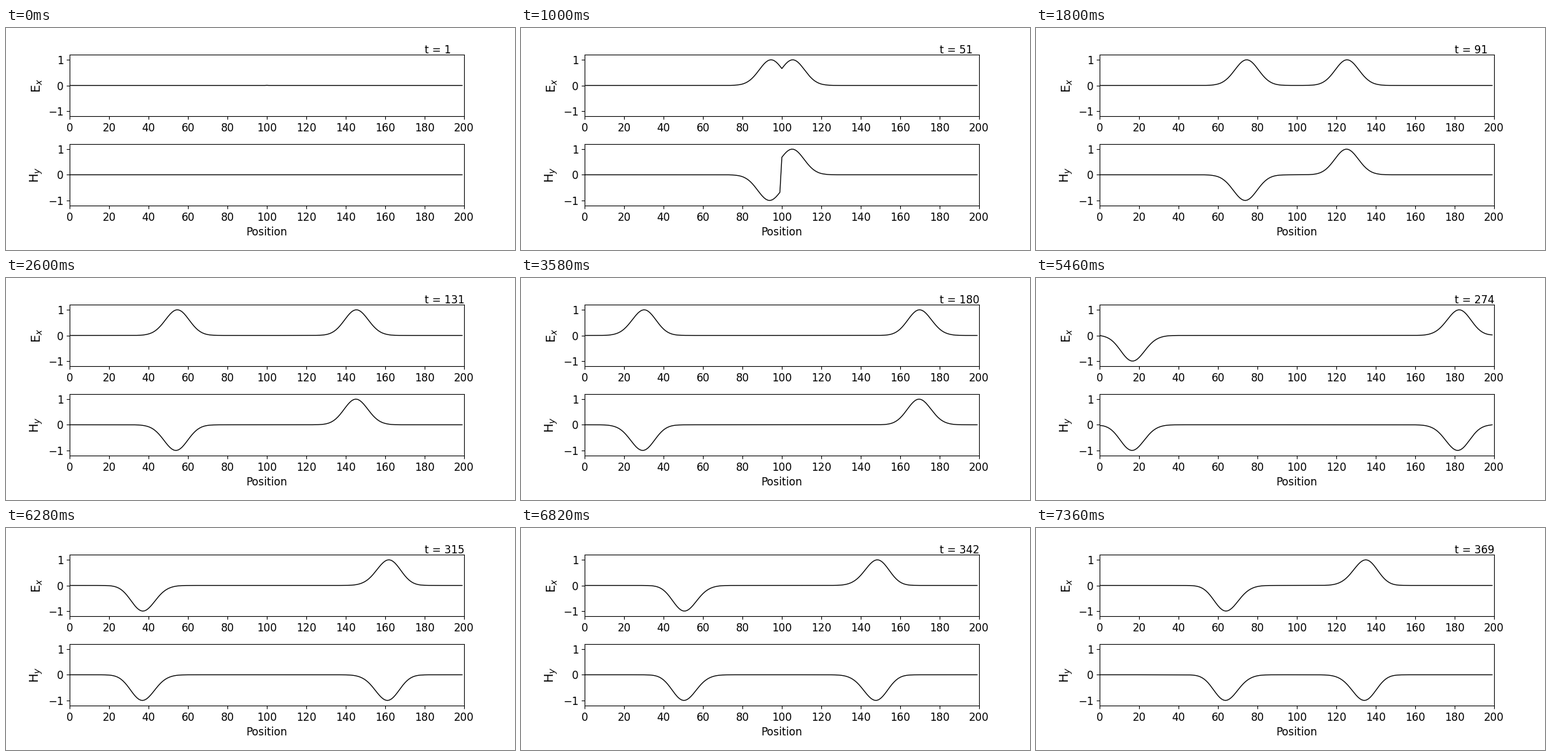
Write a matplotlib script that moves like this. It is 800x350 px and loops after 7.38 s.

```python
"""1D FDTD pulse between an electric wall (left) and a magnetic wall (right)."""
import numpy as np
import matplotlib.pyplot as plt
from matplotlib.animation import FuncAnimation

CELLS, SOURCE = 200, 100
T0, SPREAD = 40, 12
STEPS = 369


def simulate():
    """Return the E and H fields after every time step."""
    ex, hy = np.zeros(CELLS), np.zeros(CELLS)
    history = []
    for t in range(1, STEPS + 1):
        ex[1:] += 0.5 * (hy[:-1] - hy[1:])
        ex[SOURCE] = np.exp(-0.5 * ((T0 - t) / SPREAD) ** 2)
        hy[:-1] += 0.5 * (ex[:-1] - ex[1:])
        history.append((ex.copy(), hy.copy()))
    return history


def setup(ax, label):
    ax.set_ylabel(label, fontsize=14)
    ax.set_xticks(np.arange(0, 201, 20))
    ax.set_xlim(0, 200)
    ax.set_yticks([-1, 0, 1])
    ax.set_ylim(-1.2, 1.2)
    line, = ax.plot(np.arange(CELLS), np.zeros(CELLS), color="k", linewidth=1)
    return line


plt.rcParams["font.family"] = "DejaVu Sans"
plt.rcParams["font.size"] = 12

fig, (ax_e, ax_h) = plt.subplots(2, 1, figsize=(8, 3.5), dpi=100)
fig.subplots_adjust(left=0.125, right=0.9, bottom=0.2, top=0.88, hspace=0.45)
e_line = setup(ax_e, "E$_x$")
h_line = setup(ax_h, "H$_y$")
ax_h.set_xlabel("Position")
clock = ax_e.text(180, 1.25, "")

fields = simulate()


def update(i):
    ex, hy = fields[i]
    e_line.set_ydata(ex)
    h_line.set_ydata(hy)
    clock.set_text(f"t = {i + 1}")
    return e_line, h_line, clock


anim = FuncAnimation(fig, update, frames=STEPS, interval=20,
                     repeat=True, repeat_delay=0)
plt.show()
```
